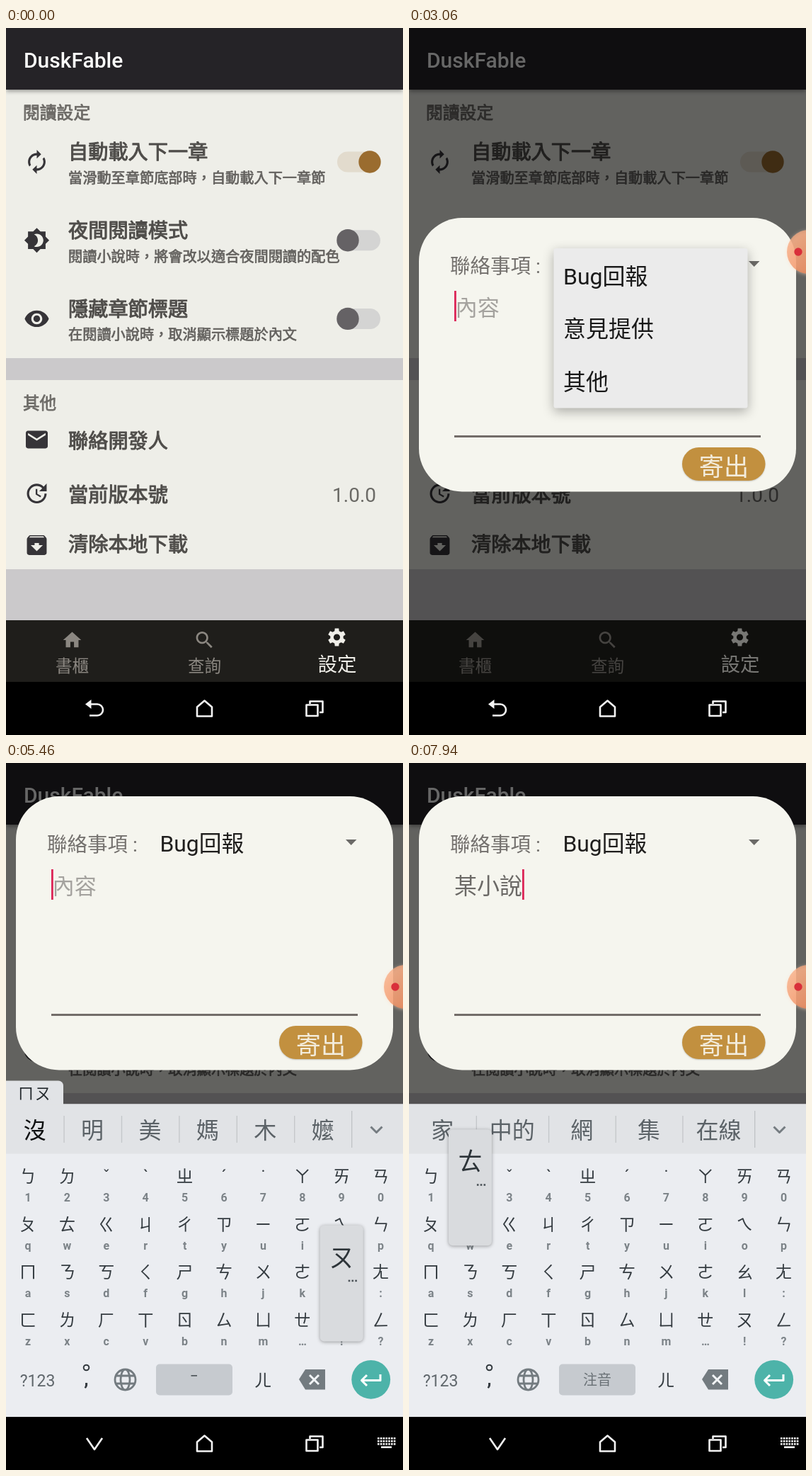
Animation, 561 px wide and 998 px high, one loop 8000 ms. Source, as an HTML page with a canvas:

```html
<!DOCTYPE html>
<html lang="zh-Hant-TW">
<head>
<meta charset="utf-8">
<title>Settings</title>
<style>
html, body { margin: 0; width: 100%; height: 100%; overflow: hidden; background: #000; }
canvas { display: block; width: 561px; height: 998px; }
</style>
</head>
<body>
<canvas id="stage"></canvas>
<script>
const W = 561, H = 998, LOOP = 8000;
const FONT = 'Roboto, "Noto Sans CJK TC", "Noto Sans CJK", "Noto Sans CJK SC", sans-serif';
const canvas = document.getElementById('stage');
const dpr = window.devicePixelRatio || 1;
canvas.width = Math.round(W * dpr);
canvas.height = Math.round(H * dpr);
const c = canvas.getContext('2d');

const ICONS = {
  renew: 'M12 6v3l4-4-4-4v3c-4.42 0-8 3.58-8 8 0 1.57.46 3.03 1.24 4.26L6.7 14.8c-.45-.83-.7-1.79-.7-2.8 0-3.31 2.69-6 6-6zm6.76 1.74L17.3 9.2c.44.84.7 1.79.7 2.8 0 3.31-2.69 6-6 6v-3l-4 4 4 4v-3c4.42 0 8-3.58 8-8 0-1.57-.46-3.03-1.24-4.26z',
  night: 'M20 8.69V4h-4.69L12 .69 8.69 4H4v4.69L.69 12 4 15.31V20h4.69L12 23.31 15.31 20H20v-4.69L23.31 12zM12 18c-.89 0-1.74-.2-2.5-.55C11.56 16.5 13 14.42 13 12s-1.44-4.5-3.5-5.45C10.26 6.2 11.11 6 12 6c3.31 0 6 2.69 6 6s-2.69 6-6 6z',
  eye: 'M12 4.5C7 4.5 2.73 7.61 1 12c1.73 4.39 6 7.5 11 7.5s9.27-3.11 11-7.5c-1.73-4.39-6-7.5-11-7.5zM12 17c-2.76 0-5-2.24-5-5s2.24-5 5-5 5 2.24 5 5-2.24 5-5 5zm0-8c-1.66 0-3 1.34-3 3s1.34 3 3 3 3-1.34 3-3-1.34-3-3-3z',
  mail: 'M20 4H4c-1.1 0-2 .9-2 2v12c0 1.1.9 2 2 2h16c1.1 0 2-.9 2-2V6c0-1.1-.9-2-2-2zm0 4l-8 5-8-5V6l8 5 8-5z',
  update: 'M21 10.12h-6.78l2.74-2.82c-2.73-2.7-7.15-2.8-9.88-.1-2.73 2.71-2.73 7.08 0 9.79 2.73 2.71 7.15 2.71 9.88 0C18.32 15.65 19 14.08 19 12.1h2c0 1.98-.88 4.55-2.64 6.29-3.51 3.48-9.21 3.48-12.72 0-3.5-3.47-3.53-9.11-.02-12.58 3.51-3.47 9.14-3.47 12.65 0L21 3zM12.5 8v4.25l3.5 2.08-.72 1.21L11 13V8z',
  archive: 'M20.54 5.23l-1.39-1.68C18.88 3.21 18.47 3 18 3H6c-.47 0-.88.21-1.16.55L3.46 5.23C3.17 5.57 3 6.02 3 6.5V19c0 1.1.9 2 2 2h14c1.1 0 2-.9 2-2V6.5c0-.48-.17-.93-.46-1.27zM12 17.5L6.5 12H10v-2h4v2h3.5zM5.12 5l.81-1h12l.94 1z',
  home: 'M10 20v-6h4v6h5v-8h3L12 3 2 12h3v8z',
  search: 'M15.5 14h-.79l-.28-.27C15.41 12.59 16 11.11 16 9.5 16 5.91 13.09 3 9.5 3S3 5.91 3 9.5 5.91 16 9.5 16c1.61 0 3.09-.59 4.23-1.57l.27.28v.79l5 4.99L20.49 19zm-6 0C7.01 14 5 11.99 5 9.5S7.01 5 9.5 5 14 7.01 14 9.5 11.99 14 9.5 14z'
};
for (const name in ICONS) ICONS[name] = new Path2D(ICONS[name]);

const KEY_ROWS = ['ㄅㄉˇˋㄓˊ˙ㄚㄞㄢ', 'ㄆㄊㄍㄐㄔㄗㄧㄛㄟㄣ', 'ㄇㄋㄎㄑㄕㄘㄨㄜㄠㄤ', 'ㄈㄌㄏㄒㄖㄙㄩㄝㄡㄥ'];
const SUB_ROWS = ['1234567890', 'qwertyuiop', 'asdfghjkl:', 'zxcvbnm…!?'];

// [time, composing text, candidates]
const TYPING = [
  [0, '', ''],
  [4990, 'ㄇ', '沒 明 美 媽 木 嬤'],
  [5420, 'ㄇㄡ', '沒 明 美 媽 木 嬤'],
  [5520, 'ㄇㄡ', '某 謀 否 牟 眸 冇'],
  [6080, 'ㄇㄡˇ', '某 否 冇 牡 畝 母'],
  [6230, 'ㄇㄡˇ ㄒ', '某些 某項 否 某 冇'],
  [6390, 'ㄇㄡˇ ㄒㄧ', '某些 某項 否 某 冇'],
  [6530, 'ㄇㄡˇ ㄒㄧㄠ', '某校 某項 否 某 冇'],
  [6690, 'ㄇㄡˇ ㄒㄧㄠˇ', '某小 某曉 否 某 冇'],
  [7290, 'ㄇㄡˇ ㄒㄧㄠˇ ㄕ', '某小 某曉 否 某 冇'],
  [7360, 'ㄇㄡˇ ㄒㄧㄠˇ ㄕㄨ', '某小 某曉 否 某 冇'],
  [7430, 'ㄇㄡˇ ㄒㄧㄠˇ ㄕㄨㄛ', '某小說 某小 否 某 冇'],
  [7650, '', '家 中的 網 集 在線']
];
// [key, pressed, released]
const PRESSES = [
  ['ㄇ', 4950, 5110], ['ㄡ', 5400, 5560], ['ˇ', 6050, 6180], ['ㄒ', 6200, 6340], ['ㄧ', 6360, 6480],
  ['ㄠ', 6490, 6600], ['ˇ', 6600, 6760], ['ㄕ', 7270, 7350], ['ㄨ', 7350, 7420], ['ㄛ', 7420, 7560], ['ㄊ', 7880, 8000]
];

const clamp = v => Math.max(0, Math.min(1, v));
const ease = (t, from, to) => { const p = clamp((t - from) / (to - from)); return 1 - (1 - p) ** 2; };
const mix = (a, b, p) => a + (b - a) * p;

function rect(x, y, w, h, color, r = 0) {
  c.fillStyle = color;
  c.beginPath();
  c.roundRect(x, y, w, h, r);
  c.fill();
}
function disc(x, y, r, color) {
  c.fillStyle = color;
  c.beginPath();
  c.arc(x, y, r, 0, 7);
  c.fill();
}
function line(points, color, width, closed) {
  c.strokeStyle = color;
  c.lineWidth = width;
  c.beginPath();
  points.forEach(([x, y]) => c.lineTo(x, y));
  if (closed) c.closePath();
  c.stroke();
}
function polygon(points, color) {
  c.fillStyle = color;
  c.beginPath();
  points.forEach(([x, y]) => c.lineTo(x, y));
  c.fill();
}
// y is the optical middle of the line
function text(s, x, y, size, color, weight = 400, align = 'left') {
  c.font = `${weight} ${size}px ${FONT}`;
  c.textAlign = align;
  c.fillStyle = color;
  c.fillText(s, x, y + size * .37);
}
// Han text has no medium cut, so a thin outline thickens the regular one
function mediumText(s, x, y, size, color) {
  text(s, x, y, size, color);
  c.strokeStyle = color;
  c.lineWidth = size * .036;
  c.lineJoin = 'round';
  c.strokeText(s, x, y + size * .37);
}
function icon(name, x, y, scale, color) {
  c.save();
  c.translate(x - 12 * scale, y - 12 * scale);
  c.scale(scale, scale);
  c.fillStyle = color;
  c.fill(ICONS[name], 'evenodd');
  c.restore();
}
function withShadow(blur, dy, color, draw) {
  c.save();
  c.shadowBlur = blur * dpr;
  c.shadowOffsetY = dy * dpr;
  c.shadowColor = color;
  draw();
  c.restore();
}

function gear(x, y, color) {
  c.fillStyle = color;
  c.beginPath();
  for (let i = 0; i < 6; i++) {
    const a = i * Math.PI / 3 - Math.PI / 2;
    [[-.35, 9.3], [-.22, 12.8], [.22, 12.8], [.35, 9.3]].forEach(([d, r]) =>
      c.lineTo(x + r * Math.cos(a + d), y + r * Math.sin(a + d)));
  }
  c.closePath();
  c.moveTo(x + 4.6, y);
  c.arc(x, y, 4.6, 0, 7);
  c.fill('evenodd');
}

function toggle(y, on) {
  rect(468, y - 14.5, 61, 29, on ? '#e2dbcd' : '#d4d4d3', 14.5);
  disc(on ? 514 : 483, y, 15.7, on ? '#9a6c2f' : '#656265');
}

function settings() {
  rect(0, 0, W, 923, '#cbc9cb');
  rect(0, 87, W, 379, '#eeeee8');
  rect(0, 497, W, 267, '#eeeee8');
  withShadow(6, 2, 'rgba(0,0,0,.4)', () => rect(0, 0, W, 87, '#252327'));
  text('DuskFable', 25, 44.5, 30, '#fbfbfa', 500);

  const head = '#6d6b67', ink = '#4f4d4a', dark = '#363438';
  mediumText('閱讀設定', 24, 119, 23.8, head);
  mediumText('其他', 24, 529, 23.6, head);
  [['renew', '自動載入下一章', '當滑動至章節底部時，自動載入下一章節'],
   ['night', '夜間閱讀模式', '閱讀小說時，將會改以適合夜間閱讀的配色'],
   ['eye', '隱藏章節標題', '在閱讀小說時，取消顯示標題於內文']].forEach(([name, title, note], i) => {
    const y = 189 + i * 110.7;
    icon(name, 43.5, y, 1.55, dark);
    mediumText(title, 88, y - 14, 28.2, ink);
    mediumText(note, 88, y + 22.5, 20.2, '#63615e');
    toggle(y, i === 0);
  });
  [['mail', '聯絡開發人', 581, 583], ['update', '當前版本號', 657, 659], ['archive', '清除本地下載', 730, 728.5]]
    .forEach(([name, title, iy, ty]) => {
      icon(name, 43.5, iy, 1.55, dark);
      mediumText(title, 88, ty, 28.2, ink);
    });
  text('1.0.0', 523, 659, 28, '#6b6a66', 400, 'right');

  rect(0, 836, W, 87, '#1f1e1b');
  icon('home', 93.5, 864, 1.28, '#8b8781');
  icon('search', 280.5, 864, 1.32, '#8b8781');
  gear(467.5, 860, '#f0efe9');
  text('書櫃', 93.5, 900, 23.6, '#8b8781', 400, 'center');
  text('查詢', 280.5, 900, 23.6, '#8b8781', 400, 'center');
  text('設定', 468, 898, 27.6, '#f0efe9', 400, 'center');
}

function cursorOn(t) {
  if (t >= 7650) return true;
  if (t >= 4080) return (t - 4080) % 1000 < 500;
  return (t >= 1310 && t < 1820) || (t >= 2040 && t < 2480) || (t >= 2700 && t < 3860);
}

function dialog(t) {
  const shown = ease(t, 630, 790);
  if (!shown) return;
  rect(0, 0, W, 836, `rgba(0,0,0,${.59 * shown})`);
  rect(0, 836, W, 87, `rgba(0,0,0,${.5 * shown})`);
  const lift = 174 * ease(t, 4040, 4140) + 47 * ease(t, 4280, 4430);
  const scale = mix(.9, 1, shown);
  c.save();
  c.globalAlpha = shown;
  c.translate(280.5, 461 - lift);
  c.scale(scale, scale);
  c.translate(-280.5, -461);
  rect(14, 268, 533, 386.5, '#f5f5ee', 61);
  text('聯絡事項 :', 58, 335, 28.5, '#74716e');
  text('Bug回報', 217.5, 334, 31.8, '#1f1e1d');
  polygon([[480, 329], [495.5, 329], [487.7, 337]], '#6b6a67');
  const typed = t >= 7650;
  if (typed) text('某小說', 64, 394, 32, '#6b6966');
  else text('內容', 65.5, 394, 31.2, '#a4a29e');
  if (cursorOn(t)) rect(typed ? 160 : 64, 371, 2.8, 43, '#dc2557');
  rect(64, 575, 433, 3, '#736d69');
  withShadow(2, 1, 'rgba(0,0,0,.2)', () => rect(386, 592, 117.5, 47, '#c2903f', 23.5));
  text('寄出', 445, 619, 35.2, '#f3ecdc', 400, 'center');
  c.restore();
}

function dropdown(t) {
  const alpha = t < 3400 ? ease(t, 2690, 2850) : 1 - ease(t, 3460, 3640);
  if (!alpha) return;
  c.save();
  c.globalAlpha = alpha;
  withShadow(16, 5, 'rgba(0,0,0,.3)', () => rect(204.5, 311, 274, 225.5, '#ebebeb', 3));
  ['Bug回報', '意見提供', '其他'].forEach((s, i) => text(s, 218, 350 + i * 74.6, 32, '#191919'));
  c.restore();
}

function bubble(t) {
  if (t < 660) return;
  const dock = ease(t, 2700, 3060);
  const x = t < 2700 ? mix(590, 543, ease(t, 660, 800)) : mix(543, 565, dock);
  const r = mix(27, 31, dock), y = 316;
  const fill = c.createLinearGradient(x - r, y - r, x + r, y + r);
  fill.addColorStop(0, '#f9b48c');
  fill.addColorStop(1, '#ee7440');
  c.save();
  c.globalAlpha = mix(1, .75, dock);
  withShadow(5, 1, 'rgba(255,215,190,.7)', () => disc(x, y, r, fill));
  c.restore();
  if (dock < .5) text(t < 1560 ? '00:00' : '00:01', x, y + .5, 15.5, '#fff0e6', 400, 'center');
  else disc(550, y, 5.7, '#d9303b');
}

function systemBar(keyboardUp) {
  rect(0, 923, W, 75, '#000');
  const white = '#f4f4f4';
  c.lineJoin = 'round';
  if (keyboardUp) {
    line([[114, 953], [125, 969], [136, 953]], white, 2.6);
    for (let row = 0; row < 3; row++)
      for (let i = 0; i < 7; i++) rect(525 + i * 3.8, 952 + row * 4, 2.6, 2.7, white);
    rect(530, 964.5, 15, 2.6, white);
  } else {
    c.strokeStyle = white;
    c.lineWidth = 2.6;
    c.beginPath();
    c.moveTo(118, 954.5);
    c.lineTo(129, 954.5);
    c.arc(129, 962.5, 8, -Math.PI / 2, Math.PI / 2);
    c.lineTo(118, 970.5);
    c.stroke();
    polygon([[112, 954.5], [120.5, 948], [120.5, 961]], white);
  }
  line([[270, 958.5], [280.5, 949.5], [291, 958.5], [291, 971.5], [270, 971.5]], white, 2.6, true);
  c.strokeStyle = white;
  c.strokeRect(424.5, 955.5, 16, 15.5);
  line([[429.5, 954], [429.5, 950.5], [447.5, 950.5], [447.5, 966], [443, 966]], white, 2.6);
  c.lineJoin = 'miter';
}

function candidates(list) {
  if (list) {
    const words = list.split(' ');
    const weight = s => 1 + .08 * (s.length - 1);
    const unit = 488.5 / words.reduce((sum, s) => sum + weight(s), 0);
    let x = 0;
    words.forEach((s, i) => {
      const w = unit * weight(s);
      const best = i === 0 && !list.startsWith('家');
      text(s, x + w / 2, 518.5, 32, best ? '#0d0f10' : '#5b6267', 400, 'center');
      x += w;
      if (i < words.length - 1) rect(x, 498, 1.3, 38, '#c3c6c9');
    });
  }
  rect(488, 491, 1.3, 52, '#bfc2c5');
  line([[515.5, 513.5], [523.5, 521.5], [531.5, 513.5]], '#757c81', 3);
}

function composingTab(composing) {
  c.save();
  c.letterSpacing = '2px';
  c.font = `400 22px ${FONT}`;
  rect(0, 448.5, 33 + c.measureText(composing).width, 34, '#e1e3e6', [0, 7, 0, 0]);
  text(composing, 17, 466, 22, '#22282c');
  c.restore();
}

const keyX = i => 31 + i * 55.4;
const keyY = row => 583 + row * 67.7;

function keyPopup(key) {
  const row = KEY_ROWS.findIndex(keys => keys.includes(key));
  const x = keyX(KEY_ROWS[row].indexOf(key)), top = keyY(row) - 133.5;
  withShadow(5, 1, 'rgba(0,0,0,.35)', () => rect(x - 30.5, top, 61, 164, '#d9dbde', 6));
  text(key, x, top + 45, 35, '#2d3439', 400, 'center');
  for (let i = 0; i < 3; i++) rect(x + 9.5 + i * 4.8, top + 77, 2.6, 2.6, '#4b5257');
}

function keyboard(t) {
  const [, composing, list] = TYPING.filter(step => step[0] <= t).pop();
  const grey = '#737b80', ink = '#343b40';
  c.save();
  c.beginPath();
  c.rect(0, 0, W, 923);
  c.clip();
  c.translate(0, 442 * (1 - ease(t, 4190, 4450)));
  rect(0, 481.5, W, 442, '#ebedf1');
  rect(0, 481.5, W, 70, '#e1e3e6');
  if (composing) composingTab(composing);
  candidates(list);

  KEY_ROWS.forEach((keys, row) => [...keys].forEach((key, i) => {
    text(key, keyX(i), keyY(row), 24, ink, 400, 'center');
    text(SUB_ROWS[row][i], keyX(i), keyY(row) + 30, 16, '#7b8287', 700, 'center');
  }));

  text('?123', 44.5, 871, 23, '#60676c', 400, 'center');
  c.strokeStyle = ink;
  c.lineWidth = 2;
  c.beginPath();
  c.arc(113.5, 853.5, 3.8, 0, 7);
  c.stroke();
  text(',', 113.5, 868, 26, ink, 700, 'center');

  c.strokeStyle = grey;
  c.lineWidth = 2.8;
  c.beginPath();
  c.arc(168.5, 870.5, 14.5, 0, 7);
  c.moveTo(175, 870.5);
  c.ellipse(168.5, 870.5, 6.5, 14.5, 0, 0, 7);
  c.moveTo(155.5, 865);
  c.lineTo(181.5, 865);
  c.moveTo(155.5, 876);
  c.lineTo(181.5, 876);
  c.stroke();

  rect(212, 848.5, 108, 44, '#c6cacf', 5);
  if (composing) rect(261.5, 864, 8.5, 1.7, '#4f565b');
  else text('注音', 266, 871, 20, '#6a7176', 400, 'center');
  text('ㄦ', 363, 871, 24, ink, 400, 'center');

  polygon([[414, 870], [423, 856], [451, 856], [451, 884.5], [423, 884.5]], grey);
  line([[429, 864], [442, 877]], '#f2f4f6', 3);
  line([[442, 864], [429, 877]], '#f2f4f6', 3);

  disc(515.7, 870.3, 27.4, '#4db3a9');
  line([[529, 863], [529, 871.5], [504, 871.5]], '#fff', 3);
  line([[510, 864], [502.5, 871.5], [510, 879]], '#fff', 3);

  PRESSES.forEach(([key, down, up]) => { if (t >= down && t < up) keyPopup(key); });
  c.restore();
}

function render(now) {
  const t = now % LOOP;
  c.setTransform(dpr, 0, 0, dpr, 0, 0);
  settings();
  dialog(t);
  dropdown(t);
  if (t > 4190) keyboard(t);
  bubble(t);
  systemBar(t > 4190);
}

const start = performance.now();
function tick() {
  render(performance.now() - start);
  requestAnimationFrame(tick);
}
tick();
</script>
</body>
</html>
```
